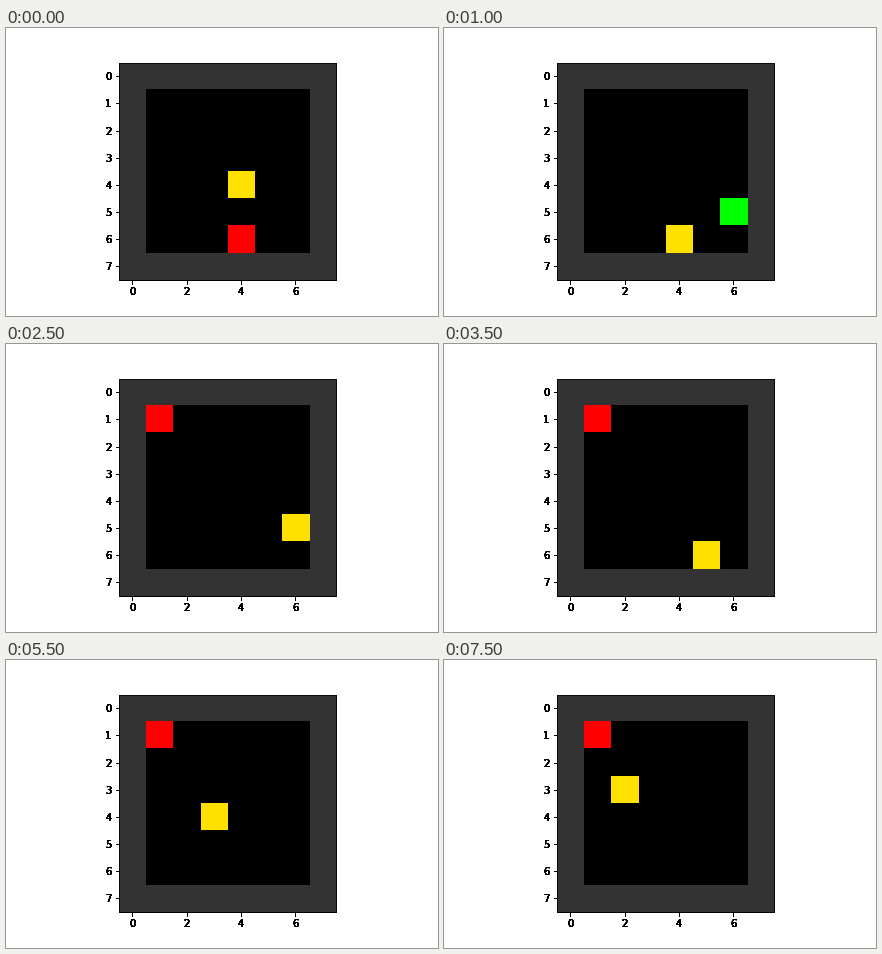
Recreate the animation shown at these times as a matplotlib script. Size 432 by 288 pixels, loop 8000 ms.

```python
import numpy as np
import matplotlib.pyplot as plt
from matplotlib.animation import FuncAnimation
from matplotlib.axes import Axes

SIZE = 8
STEP_MS = 500
WALL = (51, 51, 51)
AGENT = (255, 225, 0)
RED = (255, 0, 0)
GREEN = (0, 255, 0)

# The agent's walk: a start cell (column, row) and one move per step
START = (4, 4)
MOVES = "DDRRULDLLUULDUU"
DELTA = {"U": (0, -1), "D": (0, 1), "L": (-1, 0), "R": (1, 0)}

# Goals: first step, cell, colour
GOALS = [(0, (4, 6), RED), (2, (6, 5), GREEN), (5, (1, 1), RED)]


class SolidAxes(Axes):
    """Axes drawn in several passes, so soft edges of text and lines turn solid."""

    passes = 16

    def draw(self, renderer):
        for _ in range(self.passes):
            super().draw(renderer)


def agent_cell(step):
    moves = [DELTA[m] for m in MOVES[:step]]
    return tuple(np.add(START, np.sum(moves, axis=0, dtype=int)))


def paint(step):
    grid = np.zeros((SIZE, SIZE, 3), dtype=np.uint8)
    grid[[0, -1]] = WALL
    grid[:, [0, -1]] = WALL
    _, goal, color = [g for g in GOALS if g[0] <= step][-1]
    for (col, row), rgb in ((goal, color), (agent_cell(step), AGENT)):
        grid[row, col] = rgb
    return grid


plt.rcParams.update({"font.family": "DejaVu Sans", "font.size": 10})
fig = plt.figure(figsize=(6, 4), dpi=72, facecolor="white")
ax = fig.add_axes(SolidAxes(fig, [0.125, 0.125, 0.775, 0.755]))
image = ax.imshow(paint(0), interpolation="nearest")
ax.set_xticks(range(0, SIZE, 2))
ax.set_yticks(range(SIZE))


def update(step):
    image.set_data(paint(step))
    return [image]


anim = FuncAnimation(fig, update, frames=len(MOVES) + 1, interval=STEP_MS,
                     repeat=True, repeat_delay=0)
plt.show()
```
